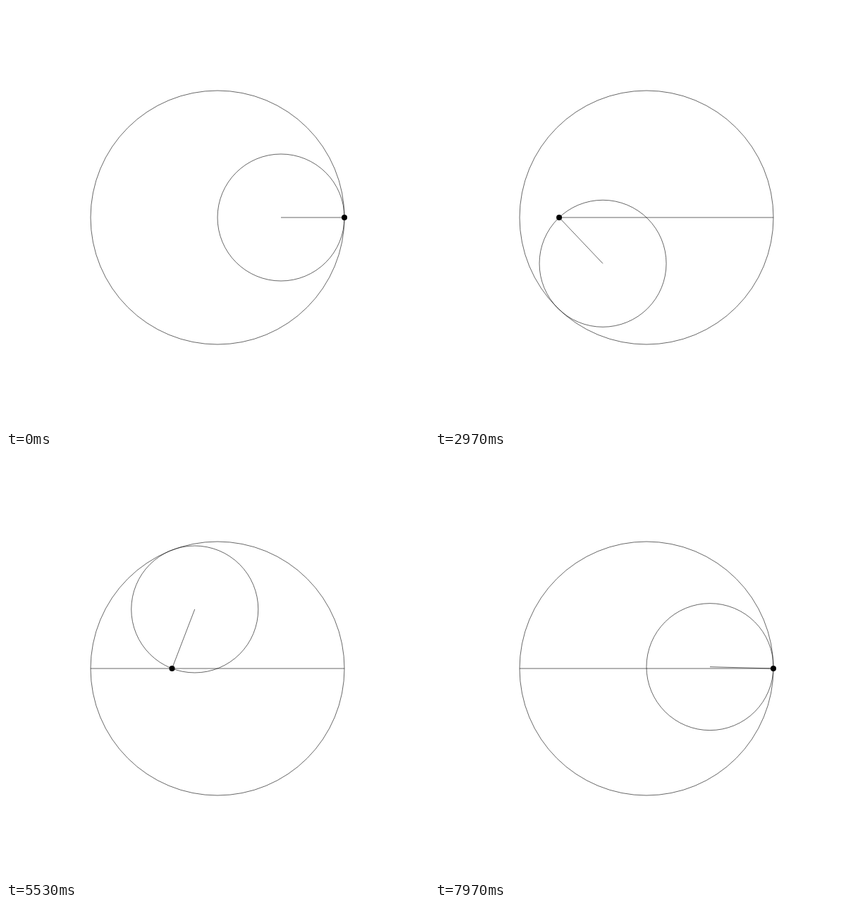
Write an HTML page that moves like this. It is 600 px wide and 600 px high and loops after 8010 ms.

```html
<!DOCTYPE html>
<html lang="en">
<head>
<meta charset="utf-8">
<title>Rolling circle</title>
<style>
  html, body { margin: 0; width: 100%; height: 100%; overflow: hidden; background: #fff; }
  svg { display: block; width: 100vw; height: 100vh; }
  .thin { fill: none; stroke: #000; stroke-width: 0.6; }
</style>
</head>
<body>
<svg viewBox="0 0 600 600">
  <circle class="thin" cx="300" cy="300" r="180"/>
  <circle class="thin" id="wheel" r="90"/>
  <line class="thin" id="trail" x1="480" y1="300" y2="300"/>
  <line class="thin" id="spoke" y2="300"/>
  <circle id="dot" cy="300" r="4"/>
</svg>
<script>
  const LOOP = 8010, STEPS = 240, CENTER = 300, RADIUS = 90;
  const [wheel, trail, spoke, dot] =
    ['wheel', 'trail', 'spoke', 'dot'].map(id => document.getElementById(id));

  function set(el, attrs) {
    for (const name in attrs) el.setAttribute(name, attrs[name]);
  }

  // Steps run at 30 per second, with start times rounded to 10 ms.
  const startOf = step => Math.round(step * 10 / 3) * 10;

  function stepAt(time) {
    let step = Math.min(STEPS - 1, Math.floor(time * 3 / 100) + 1);
    while (startOf(step) > time) step--;
    return step;
  }

  function draw(time) {
    const step = stepAt(time % LOOP);
    const angle = step / STEPS * 2 * Math.PI;
    const x = CENTER + RADIUS * Math.cos(angle);
    const y = CENTER + RADIUS * Math.sin(angle);
    const tip = CENTER + 2 * RADIUS * Math.cos(angle);
    set(wheel, { cx: x, cy: y });
    set(spoke, { x1: x, y1: y, x2: tip });
    set(dot, { cx: tip });
    set(trail, { x2: step < STEPS / 2 ? tip : CENTER - 2 * RADIUS });
  }

  const begin = performance.now();
  function tick() {
    draw(performance.now() - begin);
    requestAnimationFrame(tick);
  }
  draw(0);
  requestAnimationFrame(tick);
</script>
</body>
</html>
```
